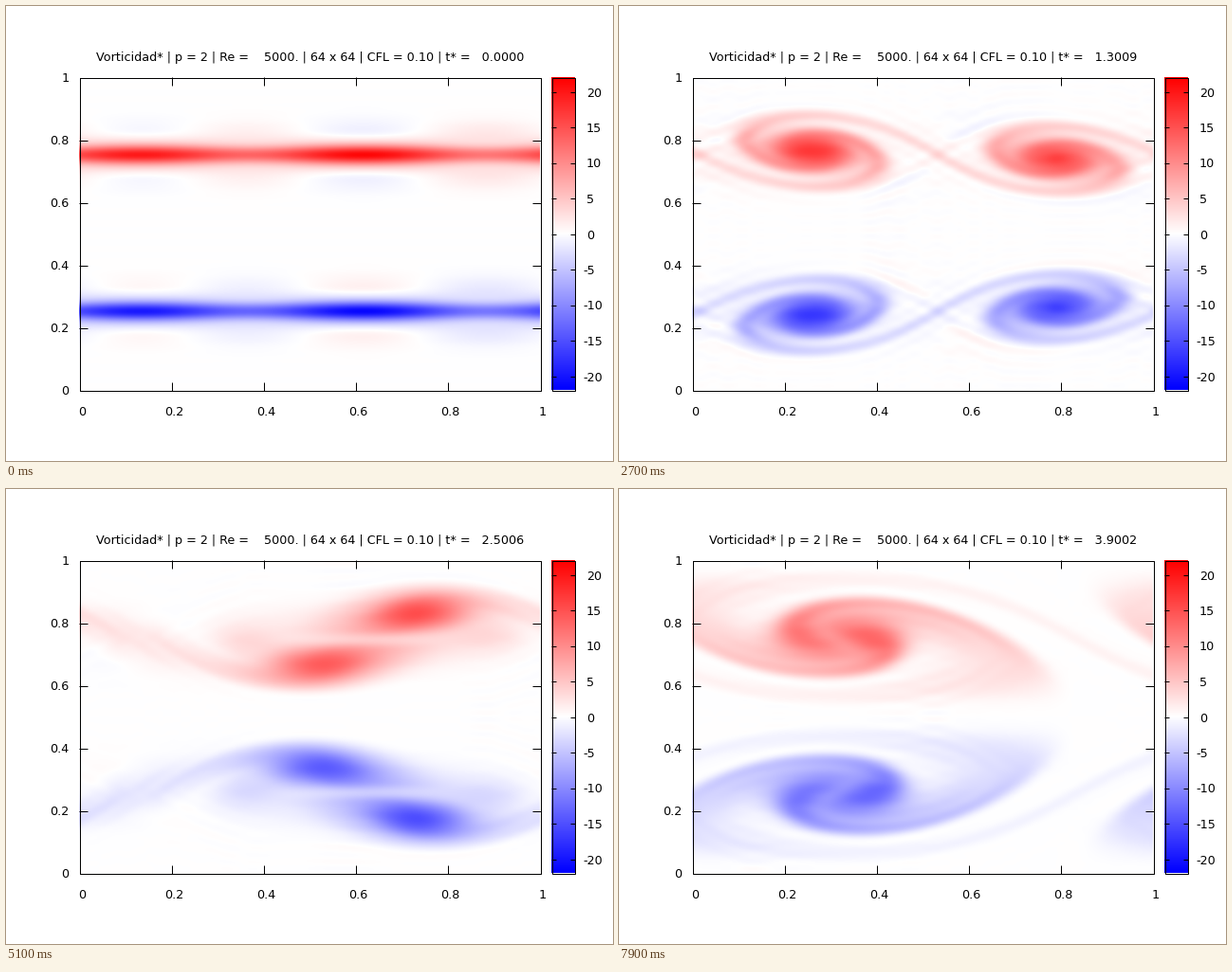
Write a matplotlib script that moves like this. It is 640 px wide and 480 px high and loops after 8000 ms.

```python
import numpy as np
import matplotlib.pyplot as plt
from matplotlib.animation import FuncAnimation
from matplotlib.colors import LinearSegmentedColormap

FRAMES, INTERVAL = 80, 100
W, H = 640, 480
X0, X1, Y0, Y1 = 77, 563, 75, 405        # plot box in pixels
CB0, CB1 = 575, 600                      # colour bar
VMAX = 22
PT = 0.72                                # points per pixel at 100 dpi

# --- flow: periodic double shear layer, pseudo-spectral, RK4 ---
N, NU, DRIFT = 72, 1 / 5000, 0.5
THICK, EPS, EPS_SUB = 0.06, 0.0056, 0.0019
DT_OUT, SUBSTEPS = 0.05, 6

modes = np.fft.fftfreq(N, 1 / N)
half = np.arange(N // 2 + 1)
KX = 2 * np.pi * half[None, :]
KY = 2 * np.pi * modes[:, None]
K2 = KX**2 + KY**2
INV_K2 = 1 / np.where(K2 == 0, 1, K2)
INV_K2[0, 0] = 0
KEEP = np.where((half[None, :] < N / 3) & (np.abs(modes[:, None]) < N / 3),
                1.0, 0.0)


def layer(x, y, yc):
    """Vorticity of one shear layer with a two-wave disturbance."""
    s = (y - yc) / THICK
    g = np.exp(-s**2)
    curv = (2 - 4 * s**2) / THICK**2
    k1, k2 = 2 * np.pi, 4 * np.pi
    wave = EPS * np.sin(k2 * x) * (curv + k2**2)
    wave = wave - EPS_SUB * np.cos(k1 * x) * (curv + k1**2)
    return 1 / (THICK * np.cosh(2 * s)**2) + wave * g


def rhs(w):
    psi = w * INV_K2
    u = np.fft.irfft2(1j * KY * psi, s=(N, N)) + DRIFT
    v = np.fft.irfft2(-1j * KX * psi, s=(N, N))
    wx = np.fft.irfft2(1j * KX * w, s=(N, N))
    wy = np.fft.irfft2(1j * KY * w, s=(N, N))
    return -KEEP * np.fft.rfft2(u * wx + v * wy) - NU * K2 * w


def step(w, dt):
    a = rhs(w)
    b = rhs(w + dt / 2 * a)
    c = rhs(w + dt / 2 * b)
    d = rhs(w + dt * c)
    return w + dt / 6 * (a + 2 * b + 2 * c + d)


def solve():
    g = np.arange(N) / N
    x, y = np.meshgrid(g, g)
    w = KEEP * np.fft.rfft2(layer(x, y, 0.75) - layer(x, y, 0.25))
    out = [w, w]
    while len(out) < FRAMES:
        for _ in range(SUBSTEPS):
            w = step(w, DT_OUT / SUBSTEPS)
        out.append(w)
    return out


def to_pixels(w):
    """Evaluate the Fourier series on the pixel grid, top row first."""
    nx, ny = X1 - X0, Y1 - Y0
    big = np.zeros((ny, nx // 2 + 1), complex)
    m = N // 2
    big[:m, :m + 1] = w[:m]
    big[-m:, :m + 1] = w[-m:]
    return np.fft.irfft2(big, s=(ny, nx))[::-1] * (nx * ny / N**2)


def clock(i):
    """Output time: first solver step past each multiple of DT_OUT."""
    if i == 0:
        return 0.0
    late = np.interp(i, [1, 12, 27, 42, 60, 71, 79],
                     [12, 2, 9, 9, 4, 6, 2])
    return DT_OUT * (i - 1) + round(float(late)) * 1e-4


def title_text(i):
    return ("Vorticidad* | p = 2 | Re =    5000. | 64 x 64 | "
            f"CFL = 0.10 | t* =   {clock(i):.4f}")


states = solve()

# --- stage ---
plt.rcParams["font.family"] = "DejaVu Sans"
fig = plt.figure(figsize=(W / 100, H / 100), dpi=100, facecolor="white")
ax = fig.add_axes([0, 0, 1, 1])
ax.axis("off")
cmap = LinearSegmentedColormap.from_list("bwr", ["blue", "white", "red"], 512)


def image(data, x0, x1):
    return ax.imshow(data, extent=(x0, x1, Y1, Y0), cmap=cmap, vmin=-VMAX,
                     vmax=VMAX, interpolation="nearest", aspect="auto")


def line(xs, ys):
    ax.plot(xs, ys, color="black", lw=PT, solid_capstyle="butt", zorder=3)


def box(x0, x1):
    l, r, t, b = x0 + 0.5, x1 + 0.5, Y0 + 0.5, Y1 + 0.5
    line([l, r, r, l, l], [t, t, b, b, t])


def label(x, y, s, ha="left"):
    return ax.text(x, y, s, ha=ha, va="baseline", color="black",
                   fontsize=12.7 * PT, zorder=4)


field = image(to_pixels(states[0]), X0, X1)
image(np.linspace(VMAX, -VMAX, Y1 - Y0)[:, None], CB0, CB1)
box(X0, X1)
box(CB0, CB1 - 1)

TICK = 9
for n in range(6):
    f = n / 5
    x = X0 + 0.5 + f * (X1 - X0)
    y = Y1 + 0.5 - f * (Y1 - Y0)
    if 0 < n < 5:
        line([x, x], [Y0, Y0 + TICK])
        line([x, x], [Y1 + 1, Y1 + 1 - TICK])
        line([X0, X0 + TICK], [y, y])
        line([X1 + 1, X1 + 1 - TICK], [y, y])
    label(x + 2.3, 432, f"{f:g}", "center")
    label(66.5, y + 5, f"{f:g}", "right")

for val in range(-20, 21, 5):
    y = Y0 + 0.5 + (VMAX - val) / (2 * VMAX) * (Y1 - Y0)
    line([CB0, CB0 + 5], [y, y])
    line([CB1 - 5, CB1], [y, y])
    label(608 if val < 0 else 612, y + 5, str(val))

title = label(95, 58, title_text(0))
ax.set_xlim(0, W)
ax.set_ylim(H, 0)


def update(i):
    field.set_data(to_pixels(states[i]))
    title.set_text(title_text(i))
    return field, title


anim = FuncAnimation(fig, update, frames=FRAMES, interval=INTERVAL,
                     repeat=True, repeat_delay=0, blit=False)
plt.show()
```
